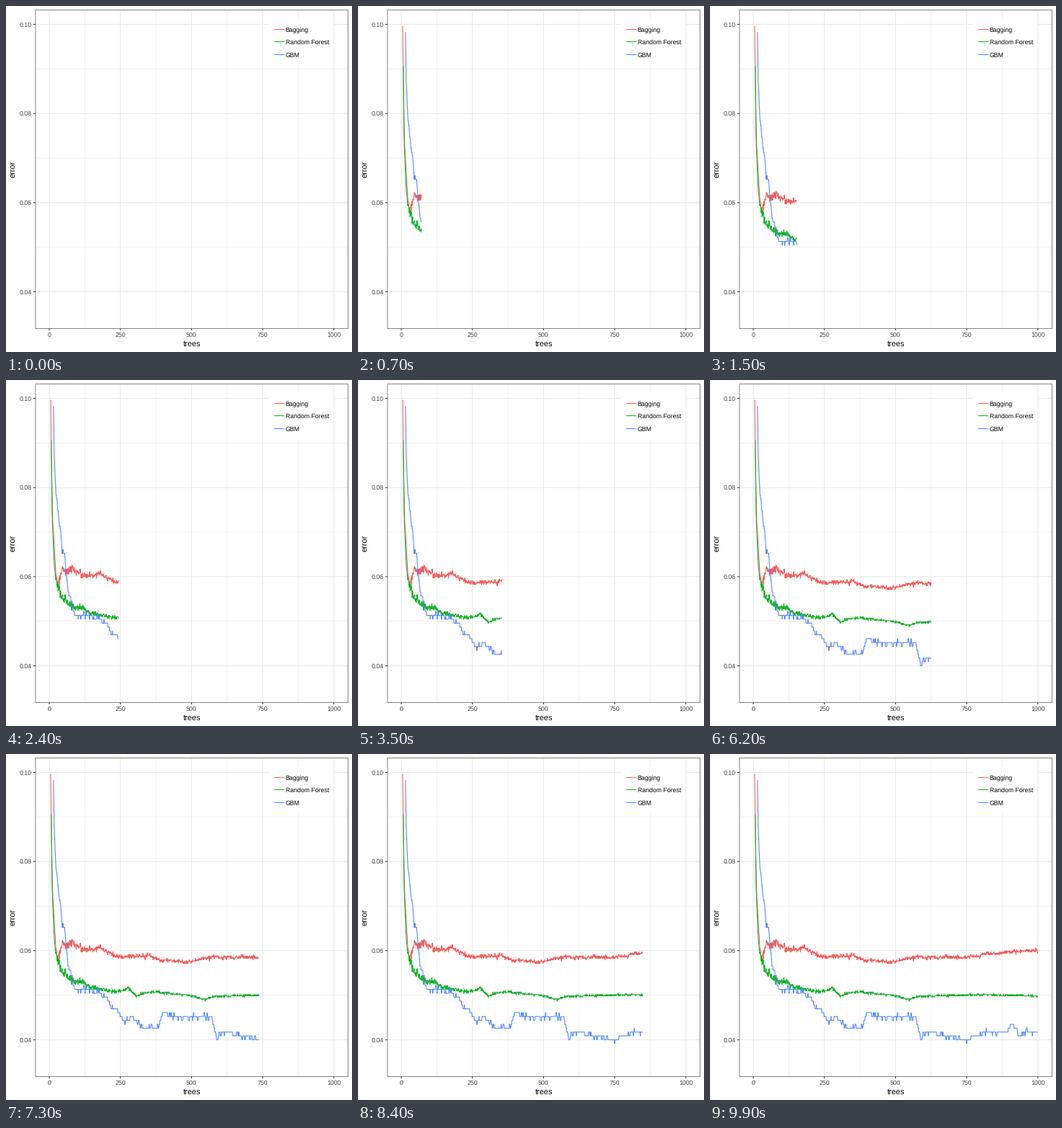
Animation of 480x480 px, one loop 10 s. Source, as a matplotlib script:

```python
import numpy as np
import matplotlib.pyplot as plt
from matplotlib.animation import FuncAnimation
from matplotlib.patches import Rectangle

SIZE, FRAMES, TREES = 480, 100, 1000
LEFT, TOP, RIGHT, BOTTOM = 40.7, 5.5, 474.5, 447.3
RED, GREEN, BLUE = "#F35E5A", "#17B12B", "#5086FF"
GRID, DARK, LABEL = "#E8E8E8", "#333333", "#444444"

plt.rcParams["font.family"] = "Liberation Sans"
plt.rcParams["text.hinting"] = "none"
plt.rcParams["path.simplify"] = False


def px(tree):
    return 60.02 + 0.39476 * tree


def py(error):
    return 643.8 - 6183 * error


def curve(keys, cases, gap, late, early, seed):
    """Error per tree: a trend through (tree, error in 1/1000) keys plus
    fading jitter, rounded to whole counts out of `cases`."""
    rng = np.random.default_rng(seed)
    at, level = np.transpose(keys)
    tree = np.arange(at[0], TREES + 1)
    jitter = np.zeros(len(tree))
    for step, weight in ((gap, 1), (12, 0.6)):
        knots = np.arange(0, TREES + 2 * step, step)
        jitter += weight * np.interp(tree, knots,
                                     rng.standard_normal(len(knots)))
    jitter *= (late + early * np.exp(-tree / 130)) * np.clip(tree / 40, 0, 1)
    error = (np.interp(tree, at, level) + jitter) / 1000
    return tree, np.round(error * cases) / cases


bagging = curve(
    [(5, 99.7), (8, 84), (12, 73), (22, 62), (28, 58.3), (36, 59.2),
     (46, 61.4), (85, 61.8), (130, 59.8), (175, 60.7), (250, 58.4),
     (350, 59.1), (385, 57.8), (500, 57.4), (540, 58.5), (735, 58.5),
     (900, 59.8), (1000, 59.9)],
    3451, 1, 0.2, 0.45, 3)
forest = curve(
    [(7, 90.5), (10, 74), (16, 64), (22, 60), (40, 55.8), (65, 53.6),
     (95, 53.4), (150, 51.7), (240, 50.7), (278, 51.6), (305, 50),
     (360, 50.8), (500, 49.9), (545, 49.1), (580, 49.8), (800, 50.1),
     (1000, 49.9)],
    3451, 1, 0.1, 0.6, 8)
gbm = curve(
    [(15, 98.2), (17, 88), (23, 79), (46, 65.6), (54, 64.8), (65, 56.8),
     (95, 51.2), (130, 52), (205, 49.3), (218, 47.4), (240, 47),
     (265, 44), (290, 45.3), (335, 42.4), (385, 43.6), (400, 45.8),
     (430, 45.1), (572, 45), (588, 40.3), (605, 41.6), (755, 40),
     (815, 41.5), (890, 41.6), (910, 43.4), (932, 41.2), (960, 41.7),
     (1000, 41.7)],
    1150, 3, 0.3, 0.3, 5)

fig = plt.figure(figsize=(SIZE / 72, SIZE / 72), dpi=72, facecolor="white")
ax = fig.add_axes([0, 0, 1, 1])
ax.set(xlim=(0, SIZE), ylim=(SIZE, 0))
ax.axis("off")


def rule(x, y, color, width=1.07, z=1):
    ax.plot(x, y, color=color, lw=width, solid_capstyle="butt", snap=False,
            zorder=z)


def label(x, y, s, size=8.8, color="black", **kw):
    ax.text(x, y, s, fontsize=size, color=color, va="baseline", zorder=6, **kw)


for t in range(125, 1000, 250):
    rule([px(t)] * 2, [TOP, BOTTOM], GRID, 0.6)
for e in (0.05, 0.07, 0.09):
    rule([LEFT, RIGHT], [py(e)] * 2, GRID, 0.6)
for t in range(0, 1001, 250):
    rule([px(t)] * 2, [TOP, BOTTOM], GRID)
    rule([px(t)] * 2, [BOTTOM, BOTTOM + 2.75], DARK)
    label(px(t), 459, str(t), color=LABEL, ha="center")
for e in (0.04, 0.06, 0.08, 0.10):
    rule([LEFT, RIGHT], [py(e)] * 2, GRID)
    rule([LEFT - 2.75, LEFT], [py(e)] * 2, DARK)
    label(35.7, py(e) + 3.2, f"{e:.2f}", color=LABEL, ha="right")

ax.add_patch(Rectangle((40.9, 5.5), 433.6, 442, fill=False, ec=DARK, lw=0.6,
                       snap=False, zorder=5))
label(257.6, 472, "trees", 11, ha="center")
label(13.5, 226.5, "error", 11, ha="center", rotation=90,
      rotation_mode="anchor")

ax.add_patch(Rectangle((365, 18.4), 89, 62.8, fc="white", ec="none", zorder=2))
series = [
    ("Bagging", RED, bagging),
    ("Random Forest", GREEN, forest),
    ("GBM", BLUE, gbm),
]
lines = []
for i, (name, color, _) in enumerate(series):
    row = np.floor(32.64 + 17.28 * i) + 0.5
    rule([372.2, 386], [row, row], color, z=3)
    label(387.5, row + 3.5, name)
    lines += ax.plot([], [], color=color, lw=1.07, solid_joinstyle="round",
                     solid_capstyle="butt", zorder=4)


def draw(k):
    grown = 1 + (TREES - 1) * k / (FRAMES - 1)
    for line, (_, _, (tree, error)) in zip(lines, series):
        seen = tree <= grown + 1e-6
        line.set_data(px(tree[seen]), py(error[seen]))
    return lines


anim = FuncAnimation(fig, draw, frames=FRAMES, interval=100, repeat=True,
                     repeat_delay=0, blit=False)
plt.show()
```
